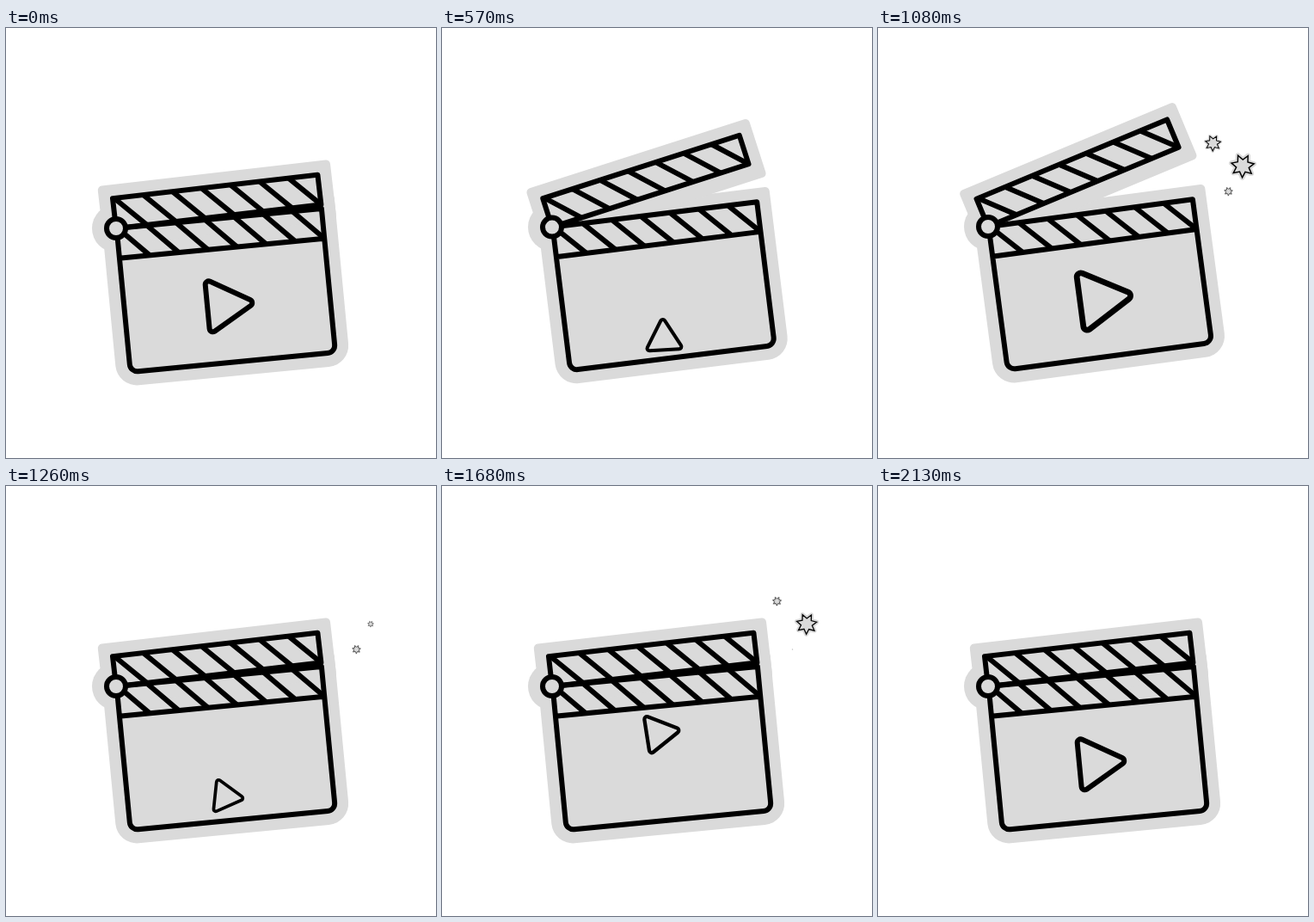
Recreate the animation shown at these times as an HTML page with a canvas. Size 500 by 500 pixels, loop 2160 ms.

```html
<!DOCTYPE html>
<html lang="en">
<head>
<meta charset="utf-8">
<title>Clapperboard</title>
<style>
html, body { margin: 0; width: 100%; height: 100%; overflow: hidden; background: #fff; }
canvas { display: block; }
</style>
</head>
<body>
<canvas id="stage" width="500" height="500"></canvas>
<script>
const ctx = document.getElementById('stage').getContext('2d');
const GRAY = '#dadada', STEP = 30, FRAMES = 72, CLAP = 15, SPIN = 21, PULSE = 18;
const W = 240, BAR = 35, H = 168, STRIPES = 7, GAP = 34, HALO = 16;
const RAD = Math.PI / 180;

// Opening amount per step of one clap; the rest of the clap stays shut.
const ARM = [0, .01, .05, .17, .70, .93, 1, 1, .98, .94, .85];
const BOARD = [0, .05, .17, .36, .73, .93, 1, 1, .97, .88, .73];

// The play sign while it tumbles: [progress, value].
const SHRINK = [[0, 1], [.2, .62], [.53, .575], [.667, .5], [.82, .62], [1, 1]];
const DRIFT = [[0, 0], [.53, -5], [.667, 5], [1, 0]];

// x, y, radius, first step; each star pulses twice.
const STARS = [[407.5, 190, 20.5, 21], [389.5, 134, 13, 24], [424, 160.5, 14.5, 27]];

function keyed(keys, u) {
  let i = 1;
  while (i < keys.length - 1 && keys[i][0] < u) i++;
  const [a, p] = keys[i - 1], [b, q] = keys[i];
  return p + (q - p) * (u - a) / (b - a);
}

const easeCubic = u => u < .5 ? 4 * u ** 3 : 1 - 4 * (1 - u) ** 3;

function at(x, y, degrees, draw) {
  ctx.save();
  ctx.translate(x, y);
  ctx.rotate(degrees * RAD);
  draw();
  ctx.restore();
}

function ink(width, color = '#000') {
  ctx.lineWidth = width;
  ctx.strokeStyle = color;
  ctx.stroke();
}

function backing(top, bottom, round) {
  ctx.beginPath();
  ctx.roundRect(-HALO, top - HALO, W + 2 * HALO, bottom - top + 2 * HALO, [5, 5, round, round]);
  ctx.fill();
}

function disc(r) {
  ctx.beginPath();
  ctx.arc(0, 0, r, 0, 7);
  ctx.fill();
}

function stripes(top) {
  ctx.beginPath();
  for (let i = 0; i < STRIPES; i++) {
    const x = W - i * GAP;
    ctx.moveTo(x - GAP, top);
    ctx.lineTo(x, top + BAR);
  }
  ink(6);
}

function boardLines() {
  ctx.beginPath();
  ctx.roundRect(.6, 0, W - .6, H, [0, 0, 9, 9]);
  ctx.moveTo(0, BAR);
  ctx.lineTo(W, BAR);
  ink(6);
  stripes(0);
}

function armLines() {
  ctx.beginPath();
  ctx.rect(0, -BAR, W, BAR);
  ink(6);
  stripes(-BAR);
}

function playSign(f, open) {
  const start = f < 36 ? 13 : 37.8;
  const u = Math.min(1, Math.max(0, (f - start) / SPIN));
  const scale = keyed(SHRINK, u) * (1 + .13 * Math.sqrt(open));
  const hop = 44 * Math.sin(2 * Math.PI * u ** 1.1);
  at(115.7 + keyed(DRIFT, u), 101 + hop, 360 * easeCubic(u), () => {
    const R = 37.5, x = -R / 2, y = R * Math.sqrt(3) / 2;
    ctx.scale(scale, scale);
    ctx.beginPath();
    ctx.moveTo(x, 0);
    ctx.arcTo(x, -y, R, 0, 4);
    ctx.arcTo(R, 0, x, y, 4);
    ctx.arcTo(x, y, x, 0, 4);
    ctx.closePath();
    ink(6);
  });
}

function star([x, y, size, start], f) {
  const age = f - start;
  if (age <= 0 || age >= 2 * PULSE) return;
  const r = size * Math.sin(Math.PI * age / PULSE) ** 2;
  if (r < .3) return;
  at(x, y, -11, () => {
    ctx.scale(r / 20, r / 20);
    ctx.beginPath();
    for (let i = 0; i < 14; i++) {
      const d = i % 2 ? 10.3 : 18.5, a = i * Math.PI / 7;
      ctx.lineTo(d * Math.cos(a), d * Math.sin(a));
    }
    ctx.closePath();
    ink(8, GRAY);
    ctx.fill();
    ctx.lineJoin = 'miter';
    ink(2);
  });
}

function draw(f) {
  const phase = f % CLAP;
  const arm = ARM[phase] || 0, board = BOARD[phase] || 0;
  const px = 128, py = 233 - 2 * board;
  const boardTilt = -5.5 - 2.1 * board, armTilt = -6.6 - 16 * arm;

  ctx.clearRect(0, 0, 500, 500);
  ctx.fillStyle = GRAY;
  ctx.lineJoin = 'round';
  at(px, py, boardTilt, () => backing(0, H, 25));
  at(px, py, armTilt, () => backing(-BAR, 4, 5));
  at(px, py, 0, () => disc(28));
  at(px, py, boardTilt, () => {
    boardLines();
    playSign(f, board);
  });
  at(px, py, armTilt, armLines);
  at(px, py, 0, () => {
    disc(11);
    ink(6);
  });
  STARS.forEach(s => star(s, f));
}

const begin = performance.now();
function tick() {
  draw(Math.floor((performance.now() - begin) / STEP) % FRAMES);
  requestAnimationFrame(tick);
}
tick();
</script>
</body>
</html>
```
